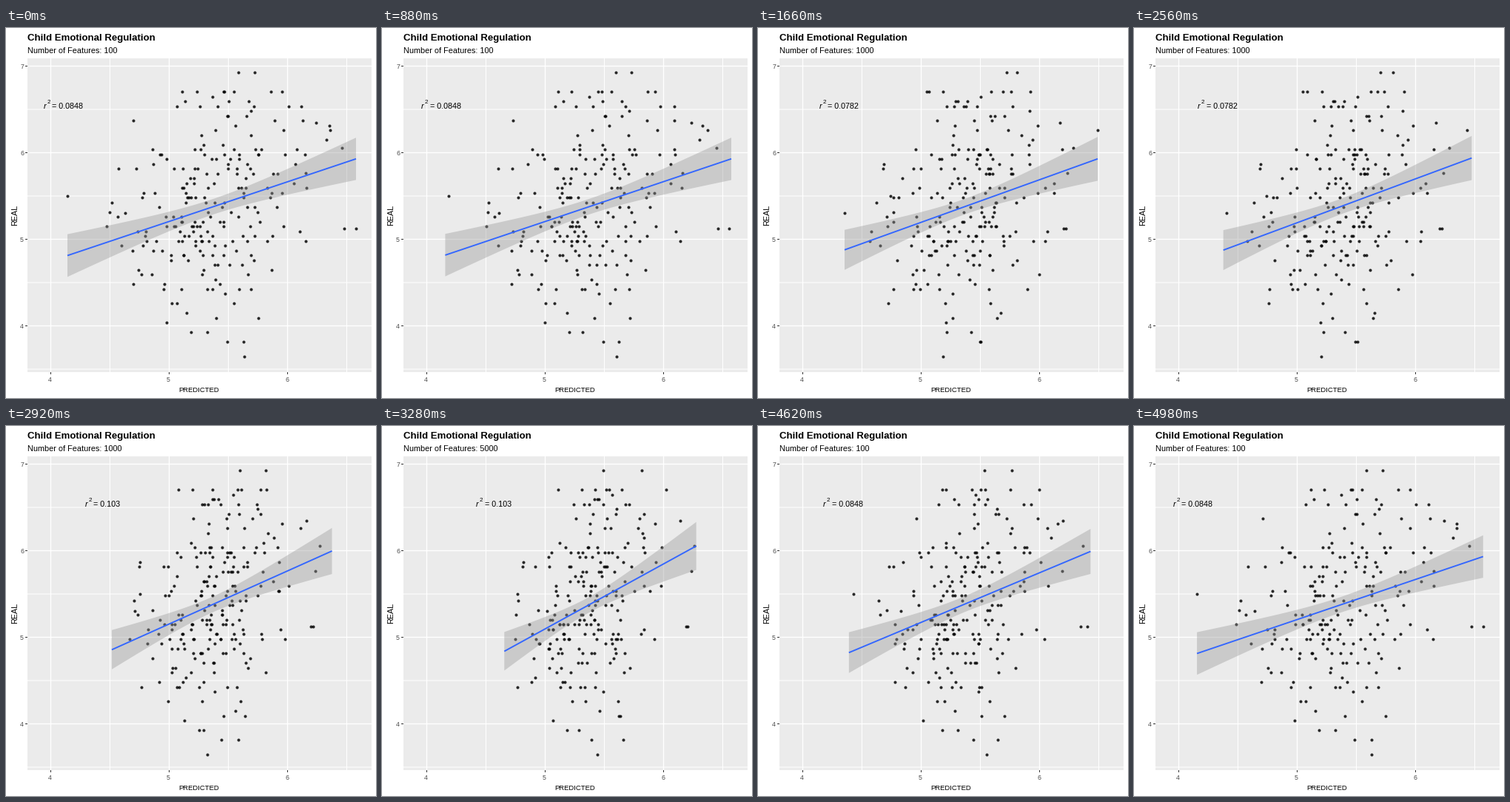
Recreate the animation shown at these times as a matplotlib script. Size 500 by 500 pixels, loop 5000 ms.

```python
import numpy as np
import matplotlib.pyplot as plt
from matplotlib.animation import FuncAnimation
from matplotlib.patches import Polygon, Rectangle

PX = 0.72  # points per pixel at 100 dpi
FRAMES, INTERVAL = 250, 20
X_MEAN, Y_MEAN = 279, 236
N_POINTS = 220
ROW_STEP = 6.5

plt.rcParams["font.family"] = "Liberation Sans"

# Points at the edges of the cloud: height, then x in each state
EDGE = [
    (60, 314, 336, 296), (60, 336, 350, 351), (128, 419, 408, 403),
    (138, 438, 459, 337), (162, 454, 426, 422), (196, 405, 418, 418),
    (227, 83, 179, 183), (250, 161, 117, 231), (271, 473, 416, 413),
    (271, 457, 413, 411),
]

COUNTS = ["100", "1000", "5000"]
R2 = ["0.0848", "0.0782", "0.103"]
R2_LEFT = [50.5, 82.5, 130.5]


def make_points():
    """Scores on evenly spaced rows, with correlated predictions."""
    rng = np.random.default_rng(11)
    y = rng.normal(Y_MEAN, 88, N_POINTS).clip(86, 446)
    y = 60 + ROW_STEP * np.round((y - 60) / ROW_STEP)
    z = 0.85 * rng.normal(size=N_POINTS) + 0.5 * rng.normal(size=(3, N_POINTS))
    spread = np.array([[62], [54], [43]])
    x = X_MEAN + spread * (z.clip(-2.2, 2.2) - 0.3 * (y - Y_MEAN) / 88)
    edge = np.array(EDGE).T
    return np.hstack([edge[1:], x]), np.hstack([edge[0], y])


def make_fit(x0, x1, y0, y1, flare):
    """Regression line with its confidence band."""
    x = np.linspace(x0, x1, 80)
    y = np.linspace(y0, y1, 80)
    half = np.hypot(10.5, flare * (x - X_MEAN))
    return np.array([x, y, y - half, y + half])


POINT_X, POINT_Y = make_points()
FITS = [
    make_fit(83, 473, 307.5, 176.8, 0.137),
    make_fit(117, 459, 299.8, 176.8, 0.154),
    make_fit(169, 422, 304.8, 161, 0.216),
]

fig = plt.figure(figsize=(5, 5), dpi=100, facecolor="white")
ax = fig.add_axes([0, 0, 1, 1])
ax.set(xlim=(0, 500), ylim=(500, 0))
ax.axis("off")


def label(x, y, s, size, **kw):
    kw.setdefault("va", "baseline")
    return ax.text(x, y, s, fontsize=size * PX, **kw)


def rule(x, y, color, width=1):
    ax.plot(x, y, color=color, lw=width * PX, snap=False,
            solid_capstyle="butt", zorder=1)


ax.add_patch(Rectangle((29, 41), 465, 424, fc="#EBEBEB", lw=0, zorder=0))
for i in range(8):
    width = 1 if i % 2 else 1.4
    x, y = 60.5 + 80 * i, 51.5 + 58.5 * i
    if i < 6:
        rule([x, x], [41, 465], "white", width)
    rule([29, 494], [y, y], "white", width)
for i in range(4):
    x, y = 60.5 + 160 * i, 51.5 + 117 * i
    if i < 3:
        rule([x, x], [465, 468], "#333333")
        label(x - 1, 478.5, str(4 + i), 8.8, ha="center", color="#4D4D4D")
    rule([26, 29], [y, y], "#333333")
    label(24, y + 3.5, str(7 - i), 8.8, ha="right", color="#4D4D4D")

label(29, 17, "Child Emotional Regulation", 13.3, weight="bold")
subtitle = label(29, 34, "", 10.9)
label(261, 492.5, "PREDICTED", 9.5, ha="center")
label(12, 253, "REAL", 10.9, ha="center", va="center", rotation=90)

dots, = ax.plot([], [], "o", ms=3.1 * PX, mfc="black", mec="black",
                mew=PX, alpha=0.76, zorder=2)
band = Polygon([[0, 0], [1, 1], [1, 0]], fc="#999999", alpha=0.4, lw=0, zorder=3)
ax.add_patch(band)
fit_line, = ax.plot([], [], color="#3366FF", lw=1.9 * PX,
                    solid_capstyle="butt", zorder=4)
r_text = label(0, 109, "r", 11, style="italic", zorder=5)
power_text = label(0, 102.5, "2", 8, zorder=5)
value_text = label(0, 109, "", 10.8, zorder=5)


def phase(i):
    """Current state, next state and progress between them."""
    if i < 84:
        return 0, 1, max(0, i - 41) / 42
    if i < 168:
        return 1, 2, max(0, i - 125) / 42
    return 2, 0, max(0, i - 209) / 41


def draw(i):
    a, b, t = phase(i)

    def mix(values):
        return values[a] * (1 - t) + values[b] * t

    dots.set_data(mix(POINT_X), POINT_Y)
    x, y, top, bottom = mix(FITS)
    fit_line.set_data(x, y)
    band.set_xy(np.column_stack([np.r_[x, x[::-1]], np.r_[top, bottom[::-1]]]))

    subtitle.set_text("Number of Features: " + COUNTS[b if t > 0.5 else a])
    value_text.set_text("= " + R2[b if t >= 0.5 else a])
    left = mix(R2_LEFT)
    for text, offset in ((r_text, 0), (power_text, 4.7), (value_text, 12)):
        text.set_x(left + offset)
    return dots, band, fit_line, subtitle, r_text, power_text, value_text


anim = FuncAnimation(fig, draw, frames=FRAMES, interval=INTERVAL,
                     repeat=True, repeat_delay=0, blit=False)
plt.show()
```
